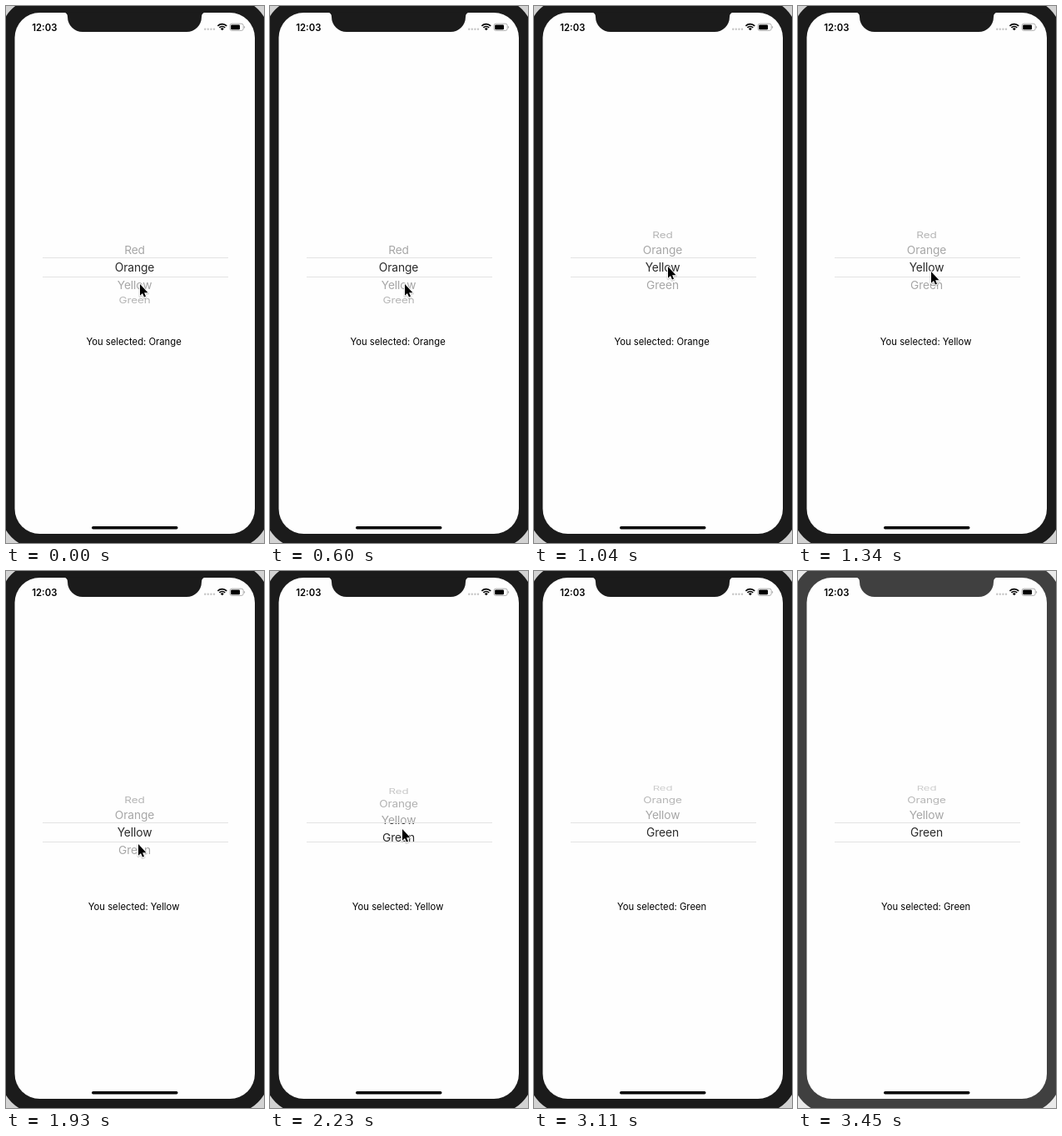
An HTML page that plays this animation: 310 by 643 pixels, repeating every 3550 ms.

```html
<!DOCTYPE html>
<html lang="en">
<head>
<meta charset="utf-8">
<title>Colour picker</title>
<style>
  html, body { margin: 0; width: 100%; height: 100%; overflow: hidden; background: #d2d2d2; }
  svg { display: block; width: 310px; height: 643px; }
  text { font-family: Inter, Roboto, "Liberation Sans", sans-serif; }
  .row { font-size: 13.8px; letter-spacing: -.1px; text-anchor: middle; }
  .label { font-size: 11.25px; text-anchor: middle; }
  .clock { font-size: 11.3px; font-weight: 600; }
</style>
</head>
<body>
<svg viewBox="0 0 310 643">
  <defs>
    <clipPath id="band"><rect x="44" y="302" width="223" height="22"/></clipPath>
    <clipPath id="outside"><path d="M44 240H267V302H44ZM44 324H267V356H44Z"/></clipPath>
    <path id="arrow" d="M2 1V14.8L5 12 7 16.6 9 15.8 7.1 11.3H11.5Z"/>
  </defs>

  <rect id="desk" width="310" height="643"/>
  <g id="bezel">
    <rect x="-7.5" y="-10" width="324.5" height="660" rx="48"/>
    <rect x="10.5" y="8" width="288.5" height="624" rx="30" fill="#fefefe"/>
    <path d="M69 7.5Q74 8 74 13A18 18 0 0 0 92 31H217A18 18 0 0 0 235 13Q235 8 240 7.5Z"/>
  </g>

  <text class="clock" x="31.3" y="29.6">12:03</text>
  <g id="dots" fill="#c6c6c6"></g>
  <g fill="none" stroke="#000" stroke-width="1.7">
    <path d="M254.4 23.9A7.6 7.6 0 0 1 265.2 23.9M256.4 25.9A4.8 4.8 0 0 1 263.2 25.9"/>
    <path d="M259.8 29.3L257.8 27.3A2.8 2.8 0 0 1 261.8 27.3Z" fill="#000" stroke="none"/>
  </g>
  <rect x="269" y="21.2" width="16.2" height="8.2" rx="2.3" fill="none" stroke="#a6a6a6" stroke-width=".9"/>
  <rect x="270.2" y="22.4" width="10.8" height="5.8" rx="1.2"/>
  <path d="M286.2 24A1.5 1.5 0 0 1 286.2 26.8Z" fill="#a0a0a0"/>

  <g clip-path="url(#outside)"><g id="dimRows"></g></g>
  <g clip-path="url(#band)"><g id="darkRows" fill="#2a2a2a"></g></g>
  <path d="M44 301.5H267M44 324.5H267" stroke="#e3e3e3"/>

  <text id="label" class="label" x="153.6" y="405.6"></text>
  <rect x="103" y="623" width="103.5" height="3.4" rx="1.7"/>

  <g id="cursor" stroke-linejoin="round">
    <use href="#arrow" y=".8" fill="none" stroke="#000" stroke-opacity=".16" stroke-width="3"/>
    <use href="#arrow" fill="#000" stroke="#fff" stroke-width="1.9" style="paint-order:stroke"/>
  </g>
</svg>
<script>
const LOOP = 3550;
const BEAT = 148.3; // the picture only changes once per beat
const COLORS = ["Red", "Orange", "Yellow", "Green"];
const WHEEL = { x: 154.5, y: 313.3, radius: 62.5, step: 0.335 };

const $ = id => document.getElementById(id);

function add(parent, tag, attrs, text = "") {
  const el = document.createElementNS("http://www.w3.org/2000/svg", tag);
  for (const key in attrs) el.setAttribute(key, attrs[key]);
  el.textContent = text;
  return parent.appendChild(el);
}

for (let i = 0; i < 4; i++) add($("dots"), "circle", { cx: 239.2 + 3.6 * i, cy: 27.8, r: 1.2 });

const makeRows = group => COLORS.map(name => add(group, "text", { class: "row", y: 5 }, name));
const dimRows = makeRows($("dimRows"));
const darkRows = makeRows($("darkRows"));

// Decelerating move from 0 to 1, in beats
function glide(beat, start, length) {
  const u = Math.min(1, Math.max(0, (beat - start) / length));
  return 1 - (1 - u) ** 2;
}

// The wheel is pulled up by one row twice
const wheelRow = beat => 1 + glide(beat, 4, 3) + glide(beat, 13, 4);

function cursorAt(beat) {
  const settle = glide(beat, 0, 1);
  const firstPull = glide(beat, 3.5, 3.5);
  const goBack = glide(beat, 8.6, 2.4);
  const secondPull = glide(beat, 12.7, 2.3);
  const leave = glide(beat, 18, 3);
  return {
    x: 159 + settle - firstPull - 2 * goBack + 134 * leave,
    y: 332 + 7 * settle - 28 * firstPull + 21 * goBack - 24 * secondPull + 376 * leave
  };
}

function turnWheel(position) {
  COLORS.forEach((_, i) => {
    const angle = (i - position) * WHEEL.step;
    const y = WHEEL.y + WHEEL.radius * Math.sin(angle);
    const tilt = Math.cos(angle);
    const transform = `translate(${WHEEL.x} ${y}) scale(${0.9 + 0.1 * tilt} ${tilt})`;
    dimRows[i].setAttribute("transform", transform);
    darkRows[i].setAttribute("transform", transform);
    dimRows[i].setAttribute("fill-opacity", 0.37 * tilt);
  });
}

function render(time) {
  const beat = Math.floor((time + 8.5) / BEAT);
  const cursor = cursorAt(beat);
  const selected = Math.floor(wheelRow(beat - 1)); // the label follows one beat later
  const faded = time >= LOOP - 100;
  turnWheel(wheelRow(beat));
  $("label").textContent = "You selected: " + COLORS[selected];
  $("cursor").setAttribute("transform", `translate(${Math.round(cursor.x)} ${Math.round(cursor.y)})`);
  $("bezel").setAttribute("fill", faded ? "#404040" : "#1b1b1b");
  $("desk").setAttribute("fill", faded ? "#eaeaea" : "#d2d2d2");
}

const start = performance.now();
function tick() {
  render((performance.now() - start) % LOOP);
  requestAnimationFrame(tick);
}
tick();
</script>
</body>
</html>
```
